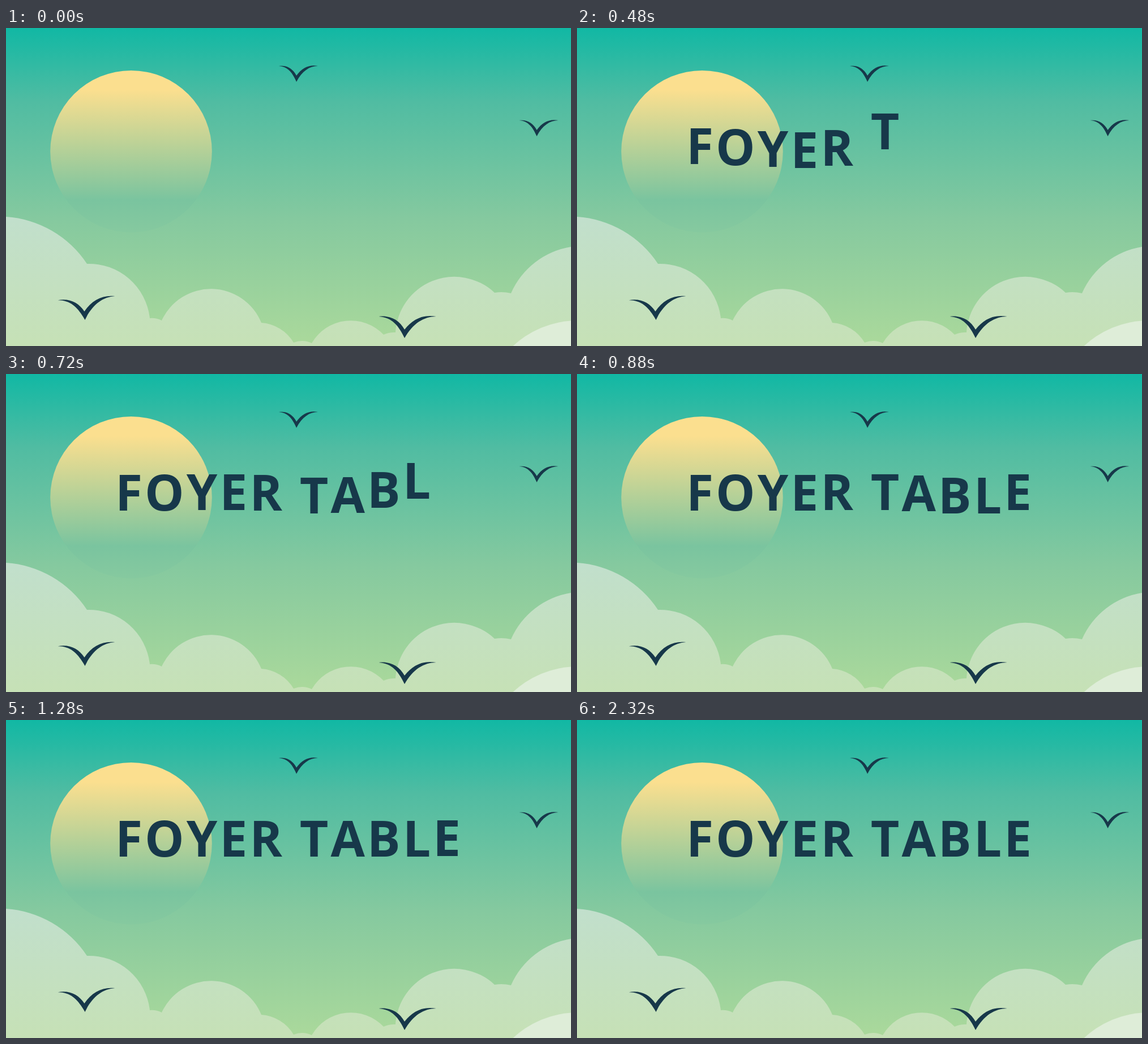
Recreate the animation shown at these times as an HTML page. Size 998 by 561 pixels, loop 2.56 s.

```html
<!DOCTYPE html>
<html lang="en">
<head>
<meta charset="utf-8">
<title>Sky title</title>
<style>
  html, body { margin: 0; width: 100%; height: 100%; overflow: hidden; }
  svg { display: block; width: 998px; height: 561px; }
</style>
</head>
<body>
<svg viewBox="0 0 998 561">
  <defs>
    <linearGradient id="sky" x1="0" y1="0" x2="0" y2="1">
      <stop offset="0" stop-color="#11b8a4"/>
      <stop offset=".23" stop-color="#50bca2"/>
      <stop offset=".6" stop-color="#85c99f"/>
      <stop offset="1" stop-color="#abd99b"/>
    </linearGradient>
    <linearGradient id="sun" x1="0" y1="0" x2="0" y2="1">
      <stop offset=".12" stop-color="#fbdf8f"/>
      <stop offset=".8" stop-color="#7ac49f"/>
      <stop offset="1" stop-color="#86c99f"/>
    </linearGradient>
    <linearGradient id="cloud" x1="0" y1="0" x2="0" y2="1">
      <stop offset="0" stop-color="#c1dfcc"/>
      <stop offset="1" stop-color="#c6e1b6"/>
    </linearGradient>
    <path id="bird" d="M-31-28C-17-30-6-23 0-11C10-25 23-31 38-28C23-28 10-19 0 0C-7-16-15-27-31-28Z"/>
  </defs>
  <rect width="998" height="561" fill="url(#sky)"/>
  <circle cx="221" cy="217.8" r="142.8" fill="url(#sun)"/>
  <path fill="url(#cloud)" d="M0 561V333A186 186 0 0 1 143 416A108 108 0 0 1 254 512
    A40 40 0 0 1 275 516A96 96 0 0 1 451 520A72 72 0 0 1 508 555A40 40 0 0 1 540 556
    A80 80 0 0 1 667 541A44 44 0 0 1 688 537A104 104 0 0 1 863 467A70 70 0 0 1 892 468
    A140 140 0 0 1 998 386V561Z"/>
  <circle cx="1010" cy="684" r="168" fill="#deedd8"/>
  <g fill="#17384a">
    <use href="#bird" transform="translate(513 95)"/>
    <use href="#bird" transform="translate(937.5 191)"/>
    <use href="#bird" transform="translate(139.5 515) rotate(-4) scale(1.47 1.36)"/>
    <use href="#bird" transform="translate(704 547) scale(1.47 1.36)"/>
    <g id="title"></g>
  </g>
</svg>
<script>
const LOOP = 2560, STEP = 80, LAST = 2320, STAGGER = 70, APPEAR = 50;
const BASELINE = 241, LEFT = 193, SPACING = 4;
const FONT = '700 87.5px "Noto Sans", "Open Sans", sans-serif';
const TITLE = 'FOYER TABLE';

const group = document.getElementById('title');
const pen = document.createElement('canvas').getContext('2d');
pen.font = FONT;
group.style.font = FONT;

let x = LEFT;
const letters = [...TITLE].map(ch => {
  const el = document.createElementNS('http://www.w3.org/2000/svg', 'text');
  el.textContent = ch;
  el.setAttribute('x', x);
  x += pen.measureText(ch).width + SPACING;
  return group.appendChild(el);
});

// Damped bounce: falls in, crosses the baseline at 187 ms and swings every 245 ms
const bounce = age => 40 * Math.exp(-age / 148) * Math.sin(Math.PI * (age - 187) / 245);

function draw(ms) {
  const t = Math.min(Math.floor(ms / STEP) * STEP, LAST);
  letters.forEach((el, i) => {
    const age = t - i * STAGGER;
    el.setAttribute('visibility', age >= APPEAR ? 'visible' : 'hidden');
    el.setAttribute('y', BASELINE + bounce(Math.max(age, 0)));
  });
}

const start = performance.now();
function tick() {
  draw((performance.now() - start) % LOOP);
  requestAnimationFrame(tick);
}
tick();
</script>
</body>
</html>
```
